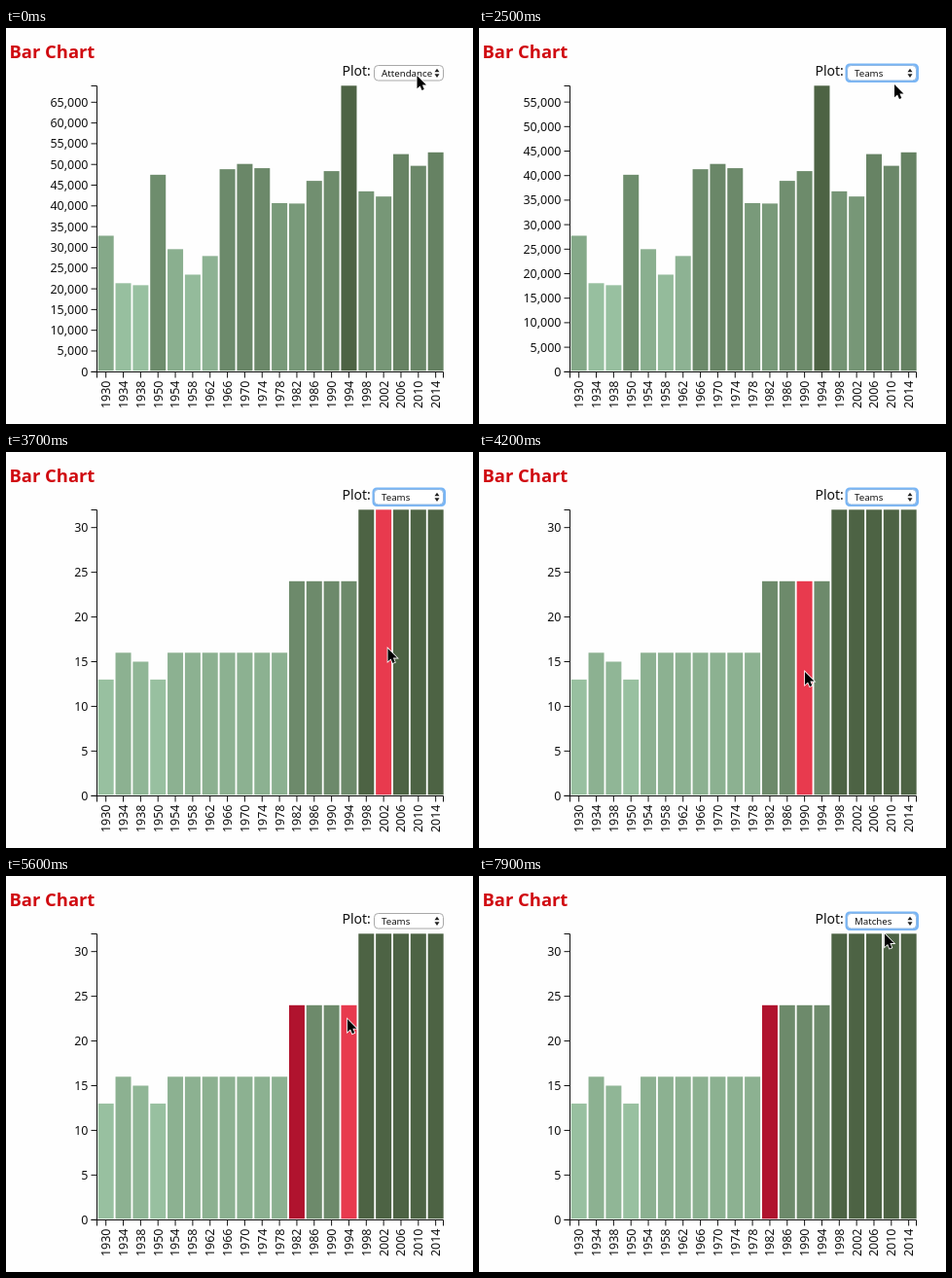
An HTML page for the animation above (8 s loop, 480x407 px).

```html
<!DOCTYPE html>
<html lang="en">
<head>
<meta charset="utf-8">
<title>Bar Chart</title>
<style>
  html, body { margin: 0; width: 100%; height: 100%; overflow: hidden; background: #fefefe; }
  svg { display: block; width: 480px; height: 407px; }
  text { font-family: "Noto Sans", "Open Sans", sans-serif; fill: #111; }
  .axis text { font-size: 12.5px; }
  .axis path { stroke: #111; fill: none; }
  .title { font-size: 18.4px; font-weight: 700; fill: #d00a10; }
  .plot { font-size: 14px; }
  .value { font-size: 9.7px; }
  #menu text { font-family: Inter, "Liberation Sans", sans-serif; font-size: 9.7px; }
</style>
</head>
<body>
<svg viewBox="0 0 480 407">
  <defs>
    <filter id="shadow" x="-20%" y="-20%" width="140%" height="150%">
      <feDropShadow dx="0" dy="3" stdDeviation="4" flood-opacity=".28"/>
    </filter>
  </defs>
  <text class="title" x="3.5" y="30.5">Bar Chart</text>
  <text class="plot" x="345.5" y="49">Plot:</text>
  <g id="select">
    <rect id="ring" x="378" y="38" width="72.5" height="16.5" rx="3" fill="none" stroke="#78b5f5" stroke-width="3"/>
    <rect id="box" x="378.5" y="38.5" width="71" height="15.5" rx="4" fill="#fff"/>
    <text id="value" class="value" x="386" y="49.5"></text>
    <path d="M440.5 45.3l2.5-3.6 2.5 3.6zM440.5 47.3l2.5 3.6 2.5-3.6z" fill="#222"/>
  </g>
  <g id="bars"></g>
  <g id="xAxis" class="axis"></g>
  <g id="yAxis" class="axis"></g>
  <g id="menu"></g>
  <path id="cursor" d="M0 0V13.2L3.1 10.5L5 15L7.3 14L5.4 9.6H9.5Z" fill="#000" stroke="#fff" stroke-width="1.6" paint-order="stroke"/>
</svg>
<script>
const LOOP = 8000, STEP = 100;
const BASE = 353.3, HEIGHT = 294, LEFT = 93.5, RIGHT = 450;
const BAR0 = 94.7, PITCH = 17.84, BAR_W = 16;
const SELECTED = 11;
const years = [1930, 1934, 1938];
for (let y = 1950; y <= 2014; y += 4) years.push(y);
const attendance = [32808, 21353, 20872, 47511, 29562, 23423, 27912, 48848, 50124, 49099,
  40679, 40572, 46039, 48389, 68991, 43517, 42269, 52491, 49670, 52918];
const teams = years.map((y, i) => i >= 15 ? 32 : i >= 11 ? 24 : [13, 16, 15, 13][i] || 16);
const options = ['Attendance', 'Teams', 'Matches', 'Goals'];

// cursor path: time, x, y
const path = [
  [0, 422.5, 49], [200, 422.5, 49], [400, 421, 44], [1200, 421, 44], [1400, 427, 58],
  [2500, 427, 58], [3100, 446.5, 85.5], [3300, 447, 92], [3700, 392.5, 202],
  [4200, 335, 226], [4500, 300.5, 234], [5200, 300.5, 234], [6100, 414, 38.5],
  [6500, 414, 38.5], [6900, 417, 59.5], [LOOP, 417, 59.5]
];
// menu: open, blink off, fade, close, top edge, checked and chosen rows
const menus = [
  { open: 1200, blink: 1900, fade: 2100, close: 2300, top: 33.5, checked: 0, pick: 1, enter: 1400 },
  { open: 6500, blink: 7400, fade: 7600, close: 7800, top: 19.5, checked: 1, pick: 2, enter: 6800 }
];

const $ = id => document.getElementById(id);
const set = (el, attrs) => { for (const k in attrs) el.setAttribute(k, attrs[k]); };
const mix = (a, b, k) => a + (b - a) * k;
const cubic = k => k < .5 ? 4 * k ** 3 : 1 - 4 * (1 - k) ** 3;

function cursorAt(t) {
  const i = path.findIndex((p, n) => n && t <= p[0]);
  const a = path[i - 1], b = path[i];
  const k = (t - a[0]) / (b[0] - a[0]);
  return [mix(a[1], b[1], k), mix(a[2], b[2], k)];
}

function shade(k) {
  const lo = [152, 192, 160], hi = [77, 99, 68];
  return `rgb(${lo.map((c, i) => Math.round(mix(c, hi[i], k)))})`;
}

function tickStep(max) {
  const raw = max / 10, power = 10 ** Math.floor(Math.log10(raw)), r = raw / power;
  return power * (r >= Math.sqrt(50) ? 10 : r >= Math.sqrt(10) ? 5 : r >= Math.SQRT2 ? 2 : 1);
}

const bars = years.map(() => {
  const r = document.createElementNS('http://www.w3.org/2000/svg', 'rect');
  $('bars').append(r);
  return r;
});

$('xAxis').innerHTML = `<path d="M${LEFT} 359.5V353.5H${RIGHT - .5}V359.5"/>` + years.map((y, i) => {
  const x = BAR0 + i * PITCH + BAR_W / 2;
  return `<path d="M${x} 353.5v6"/><text transform="translate(${x + 4.4} 362.5) rotate(-90)" text-anchor="end">${y}</text>`;
}).join('');

function drawAxis(max) {
  const step = tickStep(max);
  let out = `<path d="M87.5 59.5H${LEFT}V353.5H87.5"/>`;
  for (let v = 0; v <= max; v += step) {
    const y = BASE - v / max * HEIGHT;
    out += `<path d="M87.5 ${y}H${LEFT}"/><text x="84.5" y="${y + 4.5}" text-anchor="end">${v.toLocaleString('en-US')}</text>`;
  }
  $('yAxis').innerHTML = out;
}

function drawBars(t, [cx, cy]) {
  const rest = t < 2500 ? 1 : 1 - cubic(Math.min(1, .338 + .637 * (t - 2500) / 600));
  const vals = teams.map((v, i) => mix(v, attendance[i], rest));
  const max = Math.max(...vals), min = Math.min(...vals);
  const canHover = t >= 3400 && t < 6400;
  bars.forEach((bar, i) => {
    const x = BAR0 + i * PITCH, h = vals[i] / max * HEIGHT;
    const over = canHover && cx >= x && cx <= x + BAR_W && cy >= BASE - h;
    const fill = i === SELECTED && t >= 4900 ? '#b0132e' : over ? '#e83a4e'
      : shade((vals[i] - min) / (max - min));
    set(bar, { x, y: BASE - h, width: BAR_W, height: h - 1, fill });
  });
  drawAxis(max);
}

function drawMenu(t) {
  const m = menus.find(m => t >= m.open && t < m.close);
  if (!m) { $('menu').innerHTML = ''; return; }
  const hot = t >= m.blink && t < m.blink + STEP ? -1 : t >= m.enter ? m.pick : m.checked;
  const rows = options.map((name, i) => {
    const y = m.top + 5 + i * 14.3, color = i === hot ? '#fff' : '#222';
    return (i === hot ? `<rect x="368" y="${y}" width="94.5" height="14.3" fill="#2f7bf6"/>` : '')
      + (i === m.checked ? `<path d="M374.5 ${y + 7.5}l2.4 3 4.2-7" fill="none" stroke="${color}" stroke-width="1.5"/>` : '')
      + `<text x="387" y="${y + 10.6}" style="fill:${color}">${name}</text>`;
  }).join('');
  $('menu').innerHTML = `<rect x="368" y="${m.top}" width="94.5" height="65.5" rx="4.5" fill="#e8eae8" stroke="#c9cbc9" stroke-width=".6" filter="url(#shadow)"/>` + rows;
  set($('menu'), { opacity: t < m.fade ? 1 : 1 - (t - m.fade + STEP) / (m.close - m.fade + STEP) });
}

function drawSelect(t) {
  const focus = (t >= 2100 && t < 4900) || t >= 7600;
  $('value').textContent = options[t < 2100 ? 0 : t < 7600 ? 1 : 2];
  set($('ring'), { visibility: focus ? 'visible' : 'hidden' });
  set($('box'), { stroke: focus ? '#8fb8e4' : '#a9a9a9' });
}

function draw(t) {
  const pos = cursorAt(t);
  drawBars(t, pos);
  drawSelect(t);
  drawMenu(t);
  set($('cursor'), { transform: `translate(${pos})` });
}

const start = performance.now();
let last = -1;
function tick() {
  const t = Math.floor(((performance.now() - start) % LOOP) / STEP) * STEP;
  if (t !== last) draw(last = t);
  requestAnimationFrame(tick);
}
tick();
</script>
</body>
</html>
```
